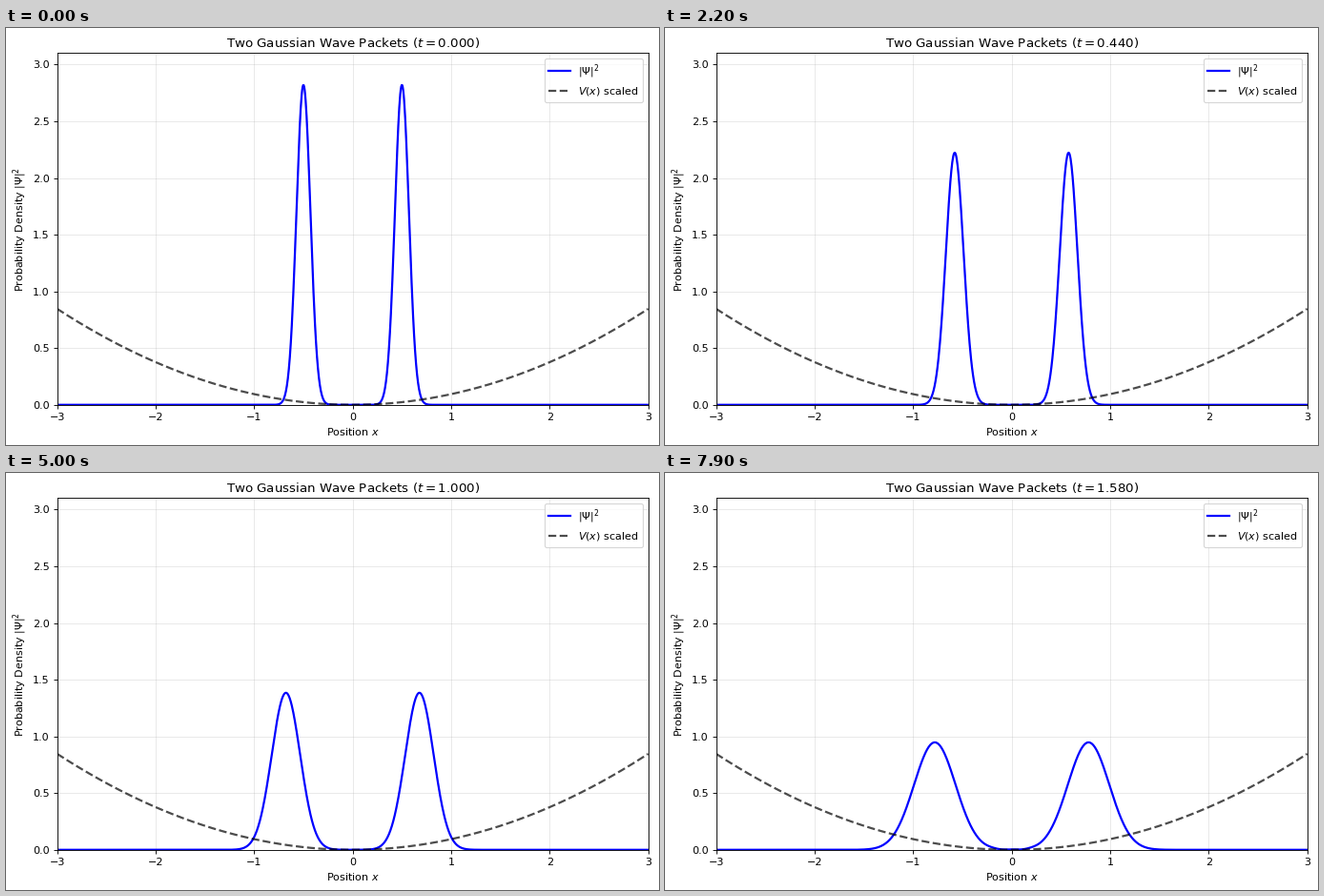
A matplotlib script that plays this animation: 685 by 438 pixels, repeating every 8 s.

```python
import numpy as np
import matplotlib.pyplot as plt
from matplotlib.animation import FuncAnimation

W, H, DPI = 685, 438, 80
FRAMES, INTERVAL, DT = 80, 100, 0.02

# hbar/m, packet width, start offset, wave number
U, A, X0, K0 = 0.01775, 0.1, 0.5, 10.0

x = np.linspace(-3, 3, 1200)


def packet(t, side):
    """Spreading Gaussian packet that leaves side * X0 moving outwards."""
    z = 1 + 1j * U * t / A**2
    d = x - side * (X0 + U * K0 * t)
    phase = -d**2 / (2 * A**2 * z) + 1j * side * K0 * d
    return np.exp(phase) / np.sqrt(2 * A * np.sqrt(np.pi) * z)


def density(t):
    return np.abs(packet(t, -1) + packet(t, 1)) ** 2


def title(t):
    return f"Two Gaussian Wave Packets ($t = {t:.3f}$)"


plt.rcParams["font.family"] = "DejaVu Sans"
fig = plt.figure(figsize=(W / DPI, H / DPI), dpi=DPI)
ax = fig.add_axes([53.67 / W, 42.22 / H, 620 / W, 369.6 / H])

peak = 1 / (2 * A * np.sqrt(np.pi))
line, = ax.plot(x, density(0), "b-", lw=2, label=r"$|\Psi|^2$")
ax.plot(x, 0.3 * peak * (x / 3) ** 2, "k--", lw=2, alpha=0.7,
        label="$V(x)$ scaled")
ax.set_xlim(-3, 3)
ax.set_ylim(0, 1.1 * peak)
ax.set_xlabel("Position $x$")
ax.set_ylabel(r"Probability Density $|\Psi|^2$")
ax.set_title(title(0))
ax.grid(True, alpha=0.3)
ax.legend(loc="upper right")


def update(i):
    t = i * DT
    line.set_ydata(density(t))
    ax.set_title(title(t))
    return line,


anim = FuncAnimation(fig, update, frames=FRAMES, interval=INTERVAL,
                     repeat=True, repeat_delay=0, blit=False)
plt.show()
```
